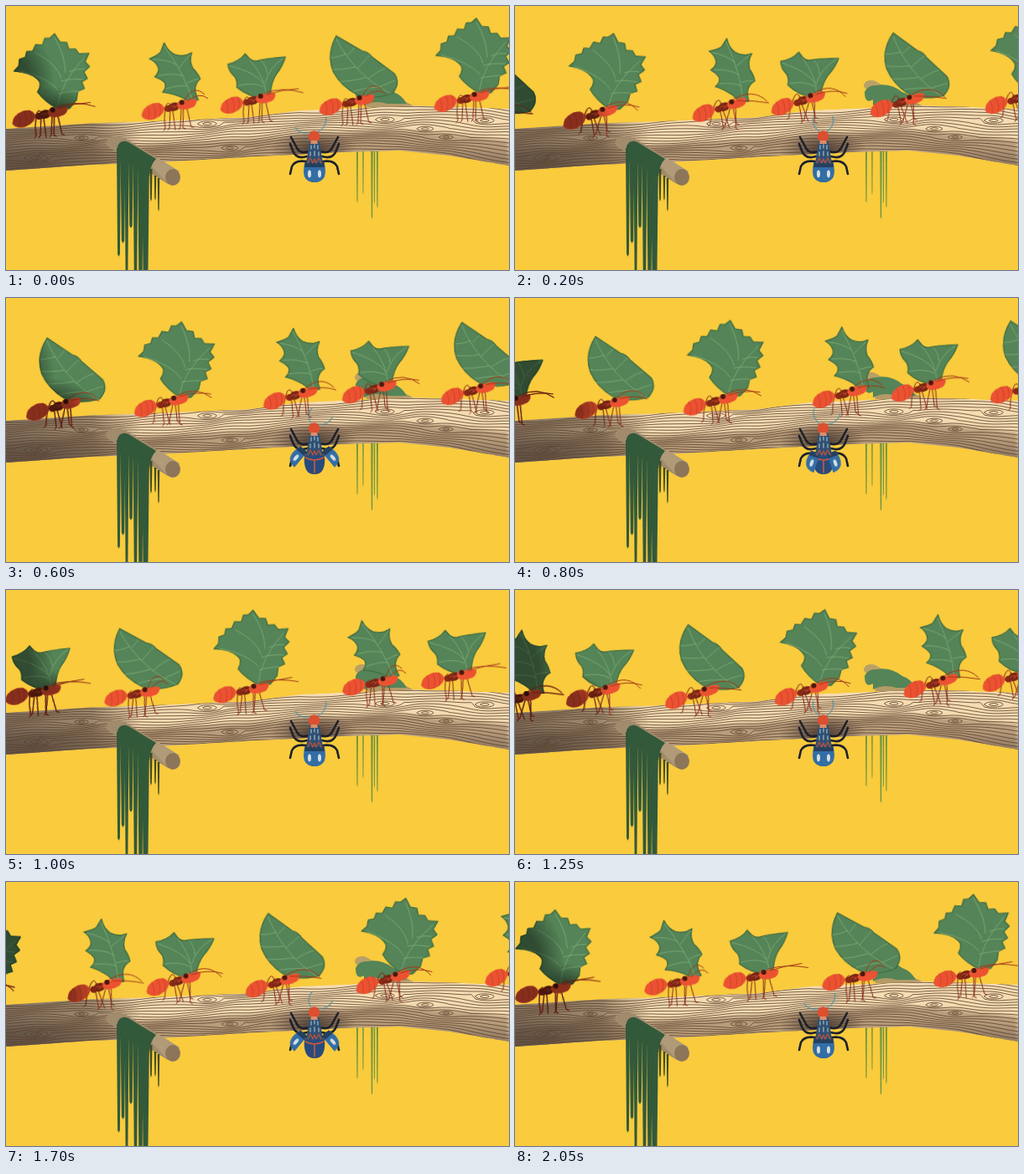
These frames come from a looping animation (600 by 316 pixels, 2100 ms). An HTML page:

```html
<!DOCTYPE html>
<html lang="en">
<head>
<meta charset="utf-8">
<title>Leafcutter ants on a branch</title>
<style>
html, body { margin: 0; width: 100%; height: 100%; overflow: hidden; background: #f9cb3d; }
svg { display: block; width: 100vw; height: 100vh; }
.line { fill: none; stroke-linecap: round; stroke-linejoin: round; }

/* two groups advance by about one spacing per loop, at 20 poses a second */
.march { animation: march 2100ms steps(42) -10ms infinite; }
.ahead { --go: 504px; }
.behind { --go: 498px; }
@keyframes march { to { transform: translate(var(--go), -18.6px); } }

.leaf, .body, .leg, .feeler { animation: 525ms ease-in-out -90ms infinite; }
.leaf { animation-name: sway; transform-origin: 48px -13px; }
.body { animation-name: tilt; transform-origin: 40px -9px; }
.leg { animation-name: step; transform-origin: 27px -3px; }
.leg.b { animation-delay: -352ms; }
.reach { animation-name: reach; }
.curl { animation-name: curl; }
@keyframes sway {
  0%, 100% { transform: rotate(calc(var(--sway) * -1)); }
  50% { transform: translate(2px, 3px) rotate(var(--sway)); }
}
@keyframes tilt { 50% { transform: translate(1px, 1px) rotate(-6deg); } }
@keyframes step {
  0%, 100% { transform: rotate(-9deg); }
  50% { transform: rotate(9deg); }
}
@keyframes reach {
  0%, 100% { d: path("M40 -14Q62 -20 88 -16M42 -12Q60 -18 80 -21"); }
  50% { d: path("M40 -12Q62 -25 77 -7M42 -10Q62 -17 79 -11"); }
}
@keyframes curl {
  0%, 100% { d: path("M38 -12Q44 -34 56 -23M42 -12Q54 -27 61 -17"); }
  50% { d: path("M38 -12Q62 -25 78 -9M42 -10Q62 -10 80 -7"); }
}

/* beetle, two turns per loop */
.wing, .horn { animation: 1050ms ease-in-out infinite; }
.wing { animation-name: open; transform-origin: 368px 180px; }
.wing.l { --x: -4px; --turn: 40deg; }
.wing.r { --x: 4px; --turn: -40deg; }
@keyframes open {
  0%, 36%, 82%, 100% { transform: none; }
  46%, 70% { transform: translate(var(--x), -1px) rotate(var(--turn)); }
}
.horn.l { animation-name: hornL; transform-origin: 364px 151px; }
.horn.r { animation-name: hornR; transform-origin: 371px 151px; }
@keyframes hornL {
  0%, 95%, 100% { transform: rotate(-50deg); }
  19%, 30% { transform: none; }
  57%, 64% { transform: rotate(28deg); }
}
@keyframes hornR {
  0%, 95%, 100% { transform: rotate(8deg); }
  19%, 30% { transform: none; }
  57%, 64% { transform: rotate(42deg); }
}
</style>
</head>
<body>
<svg viewBox="0 0 600 316" preserveAspectRatio="none">
  <defs>
    <linearGradient id="gloom">
      <stop offset="0" stop-color="#6a5a4c" stop-opacity=".82"/>
      <stop offset=".65" stop-color="#75644f" stop-opacity=".7"/>
      <stop offset="1" stop-color="#75644f" stop-opacity="0"/>
    </linearGradient>
    <radialGradient id="dark">
      <stop offset=".2" stop-color="#4f4038" stop-opacity=".85"/>
      <stop offset="1" stop-color="#4f4038" stop-opacity="0"/>
    </radialGradient>
    <radialGradient id="fade">
      <stop offset=".5" stop-color="#fff"/>
      <stop offset="1" stop-color="#fff" stop-opacity="0"/>
    </radialGradient>
    <filter id="soft" x="-5%" y="-30%" width="110%" height="160%"><feGaussianBlur stdDeviation="2.5"/></filter>
    <mask id="shade" maskUnits="userSpaceOnUse" x="0" y="0" width="600" height="316">
      <ellipse cx="0" cy="95" rx="58" ry="75" fill="url(#fade)"/>
      <ellipse cx="40" cy="135" rx="75" ry="40" fill="url(#fade)"/>
    </mask>
    <clipPath id="trunkClip"><path id="trunkEdge"/></clipPath>
  </defs>
  <rect width="600" height="316" fill="#f9cb3d"/>

  <!-- rear stub and its moss -->
  <path d="M418 91Q424 87 431 91L489 121H430Z" fill="#b39a66"/>
  <ellipse cx="425" cy="95" rx="9" ry="6" fill="#b9a067"/>
  <path d="M417 103Q421 94 432 95Q448 92 462 103Q472 106 478 117H455Q440 112 427 119V112Q417 118 417 103Z" fill="#548457"/>
  <g id="rearMoss" fill="#6f9440"></g>

  <g clip-path="url(#trunkClip)">
    <path id="trunk" fill="#f6dcb2"/>
    <path id="underside" fill="#b99d7b" filter="url(#soft)"/>
    <rect y="120" width="160" height="90" fill="url(#gloom)"/>
    <g fill="url(#dark)">
      <ellipse cx="25" cy="188" rx="125" ry="28" opacity=".6"/>
      <ellipse cx="367" cy="172" rx="52" ry="25"/>
      <ellipse cx="550" cy="194" rx="130" ry="26" opacity=".5"/>
    </g>
    <path id="grain" class="line" stroke="#5b422e" stroke-width=".8"/>
  </g>

  <g id="column"></g>
  <g mask="url(#shade)"><g id="columnDark" style="filter:brightness(.57)"></g></g>

  <!-- front stub and its moss -->
  <path d="M121 160Q126 153 142 158L205 197L193 213L124 170Q117 166 121 160Z" fill="#a08b6c"/>
  <path d="M172 190L180 181L207 198L193 213Z" fill="#b09a78"/>
  <ellipse cx="199" cy="205" rx="9" ry="10" fill="#8d755a"/>
  <g id="darkMoss" fill="#3f4c20"></g>
  <g fill="#32593a">
    <path d="M133 168Q137 159 146 163L179 183Q172 190 171 204L133 180Z"/>
    <g id="frontMoss"></g>
  </g>

  <g id="beetle">
    <g class="line" stroke="#1d2129" stroke-width="2.6">
      <path id="legs" d="M361 174Q350 178 346 168L340 157M359 180Q346 184 342 173L339 165M358 186Q345 184 341 192L339 201"/>
      <use href="#legs" transform="matrix(-1 0 0 1 736 0)"/>
    </g>
    <g class="line" stroke="#5792a0" stroke-width="1.2">
      <path class="horn l" d="M364 151Q353 144 356 133"/>
      <path class="horn r" d="M371 151Q382 144 379 132"/>
    </g>
    <path d="M356 188Q368 183 380 188Q382 211 368 211Q354 211 356 188Z" fill="#294b7c"/>
    <path class="line" d="M357 191Q368 197 379 191M368 195V209" stroke="#c9583c" stroke-width="1.6"/>
    <g class="wing l">
      <path d="M368 187H357Q350 210 368 211Z" fill="#336da6"/>
      <path d="M368 187H357L356 193H368Z" fill="#25405f"/>
      <ellipse cx="362" cy="201" rx="2" ry="4.4" fill="#d5e0e0"/>
    </g>
    <g class="wing r">
      <path d="M368 187H379Q386 210 368 211Z" fill="#336da6"/>
      <path d="M368 187H379L380 193H368Z" fill="#25405f"/>
      <ellipse cx="374" cy="201" rx="2" ry="4.4" fill="#d5e0e0"/>
    </g>
    <path d="M362 163H374L378 188H358Z" fill="#304f72"/>
    <path class="line" d="M364 167V171M368 166V170M372 167V171M363 175V179M368 174V179M373 175V179" stroke="#8ba9b6" stroke-width="1.5"/>
    <path class="line" d="M360 188L363 182L366 188L368 183L370 188L373 182L376 188" stroke="#b8533a" stroke-width="1.2"/>
    <circle cx="367.500" cy="156" r="6.800" fill="#dc4f2f"/>
    <path d="M364 161H371L372 165H363Z" fill="#d98e6c"/>
  </g>
</svg>
<script>
const $ = id => document.getElementById(id);

// ---- trunk ----
const TOP = [[0, 147], [100, 140.5], [200, 137], [290, 133], [350, 125], [420, 122], [490, 119], [600, 123]];
const BOTTOM = [[0, 197], [100, 190], [200, 186], [300, 180], [400, 175], [470, 173], [530, 179], [600, 191]];
const KNOTS = [[36, 182, 5], [240, 141, 4], [267, 170, 3.5], [452, 136, 4], [500, 147, 3.5], [571, 137, 4], [525, 157, 3], [90, 158, 3]];

function edge(points, x) {
  const i = Math.max(1, points.findIndex(p => p[0] >= x));
  const [x0, y0] = points[i - 1], [x1, y1] = points[i];
  return y0 + (y1 - y0) * (x - x0) / (x1 - x0);
}

const across = (x, f) => edge(TOP, x) * (1 - f) + edge(BOTTOM, x) * f;

function run(yAt) {
  const out = [];
  for (let x = 0; x <= 600; x += 5) out.push(x + ' ' + yAt(x).toFixed(1));
  return out;
}

const band = (f0, f1) => 'M' + run(x => across(x, f0)).join('L') +
  'L' + run(x => across(x, f1)).reverse().join('L') + 'Z';

function grainY(x, f) {
  let y = across(x, f);
  y += Math.sin(x / 19 + f * 9) * 1.2 + Math.sin(x / 47 - f * 5) * 1.5;
  for (const [kx, ky, r] of KNOTS) {
    const d = y - ky;
    y += Math.sign(d) * r * Math.exp(-(((x - kx) / 20) ** 2) - Math.abs(d) / 9);
  }
  return y;
}

$('trunk').setAttribute('d', band(0, 1));
$('trunkEdge').setAttribute('d', band(0, 1));
$('underside').setAttribute('d', band(.56, 1.2));

const ring = (x, y, rx, ry) => `M${x - rx} ${y}a${rx} ${ry} 0 1 0 ${2 * rx} 0a${rx} ${ry} 0 1 0 ${-2 * rx} 0`;
const LINES = 17;
let grain = '';
for (let i = 0; i < LINES; i++) grain += 'M' + run(x => grainY(x, (i + .5) / LINES)).join('L');
for (const [x, y, r] of KNOTS) grain += ring(x, y, r * 2.8, r * .8) + ring(x, y, r * 1.3, r * .38);
$('grain').setAttribute('d', grain);

// ---- hanging moss: x, top, bottom, width ----
const strand = ([x, top, end, w]) =>
  `<path d="M${x - w / 2} ${top}H${x + w / 2}L${x + w * .28} ${end - 3}L${x} ${end}L${x - w * .28} ${end - 3}Z"/>`;
const strands = list => list.map(strand).join('');
$('frontMoss').innerHTML = strands([
  [134.5, 170, 300, 5], [139.5, 172, 284, 6], [144, 175, 322, 5], [149, 178, 266, 6],
  [154.5, 180, 330, 6], [160.5, 182, 340, 7], [166.5, 184, 360, 9]
]);
$('darkMoss').innerHTML = strands([[173, 195, 234, 3], [178, 203, 233, 2.5], [182, 206, 246, 2.5]]);
$('rearMoss').innerHTML = strands([[419, 172, 236, 2], [426, 172, 226, 1.6], [436.5, 172, 255, 2.4], [439.5, 172, 237, 1.6], [443, 172, 242, 2]]);

// ---- ants ----
const KINDS = {
  oak: {
    sway: 4.5, feeler: 'reach',
    shape: 'M40-102L34-97 28-97 25-89 17-90 13-82 6-82 4-75-3-73-4-65-10-59Q9-57 17-49Q24-43 17-33Q25-21 42-11L54-12 63-22 65-32 73-35 70-43 77-47 73-55 80-61 75-67 80-77 68-77 64-83 56-83 54-91 46-92Z',
    veins: 'M40-14Q44-42 74-72M42-34Q30-50-3-59M46-48Q42-65 17-80M51-55Q52-74 40-97M42-30Q56-33 67-32M46-45Q58-48 72-46M56-56Q66-60 74-58'
  },
  holly: {
    sway: 8, feeler: 'curl',
    shape: 'M18-84Q22-73 30-69Q40-65 50-70Q46-60 50-51Q55-46 58-38Q51-33 51-24Q52-17 54-13L42-10Q36-20 12-25Q18-31 15-37Q11-41 4-44Q10-49 9-55Q6-63-1-66Q10-70 13-73Z',
    veins: 'M47-12Q40-45 18-80M43-30Q34-33 16-29M38-43Q26-48 8-45M31-57Q20-64 3-65M42-34Q50-38 56-38M34-53Q42-62 48-68'
  },
  maple: {
    sway: 3, feeler: 'reach',
    shape: 'M-4-50Q10-53 17-62L22-56Q27-51 35-54Q48-56 65-57Q61-45 54-37Q47-27 46-13L36-9Q20-10 6-22Q8-32 1-38Q-3-42-4-50Z',
    veins: 'M41-12Q40-33 22-55M39-25Q28-40-2-48M40-26Q45-45 63-56M38-22Q26-28 8-24M43-37Q42-47 36-53'
  },
  beech: {
    sway: 4.2, feeler: 'curl',
    shape: 'M9-86L39-67Q46-66 51-59L77-38Q84-27 74-15Q50-7 31-15Q13-25 4-43Q-4-64 9-86Z',
    veins: 'M71-15Q30-38 9-82M56-23Q39-22 27-19M43-35Q25-31 12-31M31-48Q15-45 4-46M20-64Q9-60 2-60M58-23Q71-28 77-30M45-33Q58-43 66-45M33-46Q43-57 48-61M22-62Q27-67 30-71'
  }
};

const LEGS = [
  ['', 'M24-3Q18-16 15-3Q12 8 13 21L11 23'],
  ['b', 'M27-3Q22-14 21 0L22 22L20 24'],
  ['', 'M29-4Q34-14 34-2L31 21L29 23'],
  ['b', 'M25-3Q21-9 25 4L29 23'],
  ['', 'M30-5Q39-14 41 0L44 21L47 22'],
  ['b', 'M31-6Q37-11 37 4L38 20L41 21']
];
const legs = LEGS.map(([side, d]) => `<path class="leg ${side}" d="${d}"/>`).join('');

function ant(kind, x, y) {
  const { sway, feeler, shape, veins } = KINDS[kind];
  return `<g transform="translate(${x} ${y})">
    <g class="leaf" style="--sway:${sway}deg">
      <path d="${shape}" fill="#548457" stroke="#3c683e" stroke-width="1.2" stroke-linejoin="round"/>
      <path class="line" d="${veins}" stroke="#7dab76" stroke-width=".9"/>
    </g>
    <g class="line" stroke="#85291a" stroke-width="1">${legs}</g>
    <g class="body">
      <path d="M-14 5Q-13-5-2-9Q10-13 14-3Q11 7-2 10Q-12 10-14 5Z" fill="#ec5231"/>
      <path class="line" d="M-7-6Q-3 1-6 9M0-9Q5-1 1 9M7-10Q11-2 7 6" stroke="#cc432a" stroke-width="1"/>
      <ellipse cx="18" cy="-3" rx="4.500" ry="4" fill="#8c2916"/>
      <ellipse cx="25" cy="-5" rx="7" ry="5" transform="rotate(-15 25 -5)" fill="#7a2515"/>
      <path class="line" d="M20-4Q24-9 27-4M24-3Q28-9 31-5" stroke="#c4492b" stroke-width="1"/>
      <path d="M29-8Q32-15 39-12Q46-15 52-13Q53-8 48-4Q39 0 32-2Q28-4 29-8Z" fill="#ec5231"/>
      <circle cx="34.500" cy="-10" r="3" fill="#46190f"/>
    </g>
    <path class="line feeler ${feeler}" stroke="#a3391b" stroke-width="1"/>
  </g>`;
}

const ROW = [['oak', 20, 134], ['holly', 174, 125], ['maple', 268, 117.5], ['beech', 386, 119.5]];
const row = (dx, dy) => ROW.map(([kind, x, y]) => ant(kind, x + dx, y + dy)).join('');
const column = `<g class="march behind">${row(-492, 18.6)}</g>
  <g class="march ahead">${row(1, 0)}${ant('oak', 524, 115.4)}</g>`;
$('column').innerHTML = column;
$('columnDark').innerHTML = column;
</script>
</body>
</html>
```
